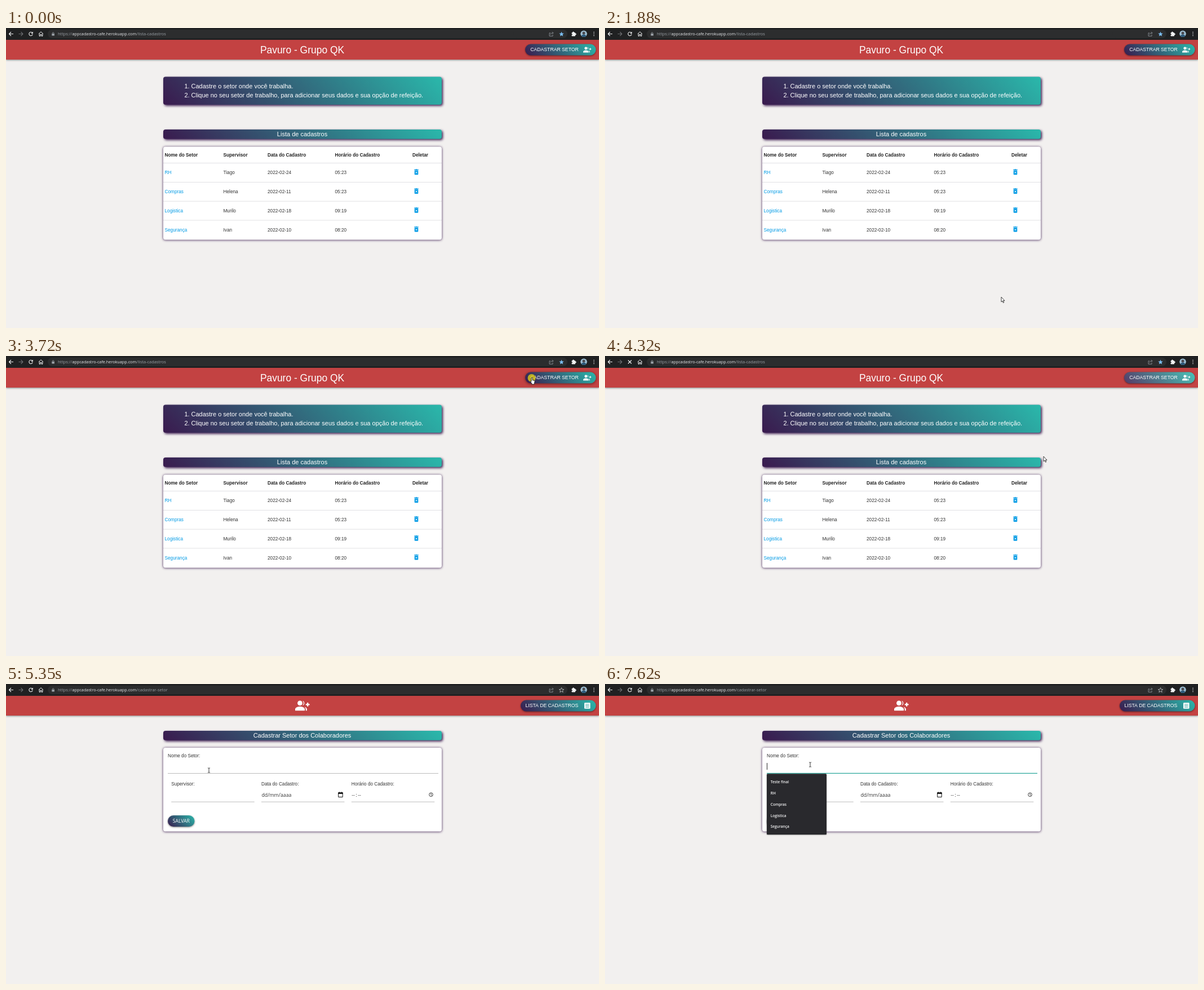
Recreate the animation shown at these times as an HTML page with a canvas. Size 1052x532 px, loop 8 s.

```html
<!DOCTYPE html>
<html lang="pt-BR">
<head>
<meta charset="utf-8">
<title>Lista de cadastros</title>
<style>
html, body { margin: 0; width: 100%; height: 100%; overflow: hidden; background: #f2f0ef; }
canvas { display: block; }
</style>
</head>
<body>
<canvas id="stage" width="1052" height="532"></canvas>
<script>
const ctx = document.getElementById('stage').getContext('2d');
const LOOP = 8000, TICK = 70;
const SANS = '"Liberation Sans", Arial, sans-serif';
const UI = '"Open Sans", "Noto Sans", sans-serif';
const PURPLE = '#3a1a4e', TEAL = '#2ab8ab', LINK = '#039be5';

const PAGE_AT = 4390, LOADED_AT = 4460;
const PRESS = [[3660, 3860], [5490, 5740]];
const FOCUS_AT = 5490, MENU_AT = 5590;

// Pointer moves: start time, ticks, from, control point, to
const MOVES = [
  [180, 6, 1021, 532, 700, 480, 403, 404],
  [600, 1, 403, 404, 407, 412, 411, 420],
  [860, 3, 411, 420, 415, 405, 419, 394],
  [1460, 7, 419, 394, 560, 520, 703, 477],
  [2140, 12, 703, 477, 870, 330, 935, 37],
  [3450, 4, 935, 37, 934, 38, 933, 39],
  [3860, 7, 933, 39, 858, 100, 778, 178],
  [4860, 8, 778, 178, 560, 185, 360, 153],
  [6020, 4, 360, 153, 362, 148, 364, 143]
];

const clamp = v => Math.max(0, Math.min(1, v));
const smooth = v => v * v * (3 - 2 * v);
const within = (t, [a, b]) => t >= a && t < b;

function pointer(t) {
  const move = MOVES.filter(m => m[0] <= t).pop();
  if (!move) return null;
  const [t0, n, x0, y0, cx, cy, x1, y1] = move;
  const p = smooth(clamp((Math.floor((t - t0) / TICK) + 1) / n)), q = 1 - p;
  return {
    x: q * q * x0 + 2 * p * q * cx + p * p * x1,
    y: q * q * y0 + 2 * p * q * cy + p * p * y1
  };
}

function text(str, x, y, size, color, { font = SANS, weight = 400, align = 'left' } = {}) {
  ctx.font = `${weight} ${size}px ${font}`;
  ctx.textAlign = align;
  ctx.fillStyle = color;
  ctx.fillText(str, x, y);
}

function rect(x, y, w, h, color) {
  ctx.fillStyle = color;
  ctx.fillRect(x, y, w, h);
}

function disc(x, y, r, color) {
  ctx.fillStyle = color;
  ctx.beginPath();
  ctx.arc(x, y, r, 0, 7);
  ctx.fill();
}

function box(x, y, w, h, r, fill, shadow) {
  ctx.save();
  if (shadow) [ctx.shadowColor, ctx.shadowOffsetX, ctx.shadowOffsetY, ctx.shadowBlur] = shadow;
  ctx.fillStyle = fill;
  ctx.beginPath();
  ctx.roundRect(x, y, w, h, r);
  ctx.fill();
  ctx.restore();
}

function path(d, x, y, { fill, stroke, width = 1, scale = 1 }) {
  const p = new Path2D(d);
  ctx.save();
  ctx.translate(x, y);
  ctx.scale(scale, scale);
  ctx.lineWidth = width;
  ctx.lineJoin = 'round';
  if (fill) { ctx.fillStyle = fill; ctx.fill(p); }
  if (stroke) { ctx.strokeStyle = stroke; ctx.stroke(p); }
  ctx.restore();
}

// Same geometry as a CSS 45deg gradient
function diagonal(x, y, w, h) {
  const cx = x + w / 2, cy = y + h / 2, d = (w + h) / 4;
  const g = ctx.createLinearGradient(cx - d, cy + d, cx + d, cy - d);
  g.addColorStop(0, PURPLE);
  g.addColorStop(1, TEAL);
  return g;
}

const banner = (y, h) => box(279, y, 494, h, 4, diagonal(279, y, 494, h), [PURPLE, 2, 2, 4]);
const card = (y, h) => box(279, y, 494, h, 4, '#fff', [PURPLE, 0, 0.5, 4]);
const pill = (x, y, w, h, blur = 3) =>
  box(x, y, w, h, h / 2, diagonal(x, y, w, h), ['rgba(0,0,0,.5)', 0, 1, blur]);

function groupAdd(x, y, scale) {
  const fill = '#fff';
  path('M0 18v-2.6c0-3.3 5.6-4.6 8.5-4.6s8.5 1.3 8.5 4.6V18z', x, y, { fill, scale });
  path('M13.2 .4a4.4 4.4 0 0 1 0 8.4a6.5 6.5 0 0 0 0-8.4z', x, y, { fill, scale });
  path('M16.3 11.2c2.4.6 4.6 1.9 4.6 4.2V18h-2.2v-2.6c0-1.800-1-3.200-2.400-4.200z', x, y, { fill, scale });
  path('M18.800 7h6.800M22.200 3.600v6.800', x, y, { stroke: fill, width: 2.2, scale });
  disc(x + 8.5 * scale, y + 4.6 * scale, 4.4 * scale, fill);
}

function trash(x, y) {
  rect(x - 3.900, y - 4.400, 7.800, 1.1, LINK);
  rect(x - 1.600, y - 5, 3.2, 0.8, LINK);
  box(x - 3.300, y - 2.800, 6.600, 7.700, 1, LINK);
  path('M-1.500-.5l3 3M1.500-.5l-3 3', x, y, { stroke: '#fff', width: 0.9 });
}

function toolbar(t) {
  const second = t >= PAGE_AT, white = '#f1f3f4', grey = '#9aa0a6';
  rect(0, 0, 1052, 21, '#202122');
  box(74, 3, 878, 15, 7.5, '#2c2d2e');
  box(900, 3, 96, 15, 7.5, '#2c2d2e');
  path('M8 0H.6M4-3.500L.5 0 4 3.500', 5, 10.5, { stroke: white, width: 1.1 });
  path('M0 0h7.400M4-3.500L7.500 0 4 3.500', 22.5, 10.5, { stroke: '#6b6d70', width: 1.1 });
  if (t >= 3860 && t < LOADED_AT) {
    path('M-3-3l6 6M3-3l-6 6', 44, 10.5, { stroke: white, width: 1.2 });
  } else {
    path('M2.300-2.300A3.200 3.200 0 1 0 3.200.6', 44, 10.5, { stroke: white, width: 1.1 });
    path('M3.800-4v3.400H.4z', 44, 10.5, { fill: white });
  }
  path('M-4 0L0-3.800 4 0M-2.900-.8V3.800h1.900V1h2v2.800h1.900V-.8', 62, 10.5, { stroke: white });
  rect(81.300, 10, 4.600, 3.600, grey);
  path('M-1.300 0v-1a1.300 1.300 0 0 1 2.600 0v1', 83.600, 10, { stroke: grey, width: 0.8 });

  text('https://', 92, 13.300, 7.4, grey, { font: UI });
  text('appcadastro-cafe.herokuapp.com', 117.5, 13.300, 7.25, '#e8eaed', { font: UI });
  text(second ? '/cadastrar-setor' : '/lista-cadastros', 231.5, 13.300, 7.4, grey, { font: UI });

  path('M-1.500-2H-3.500V3.500H2.500V1M-1.500 1C-1.300-1 0-2 3-2M1.500-4L3.500-2 1.500 0', 967.5, 10.800, { stroke: grey, width: 0.8 });
  path('M0-4.300l1.200 2.900 3.100.2-2.400 2 .8 3L0 2.200-2.700 3.800l.8-3-2.400-2 3.100-.2z', 985.5, 10.800,
    second ? { stroke: '#c4c7ca', width: 0.8 } : { fill: '#7cc0f8' });
  box(1003.5, 8, 6.5, 6.5, 1, white);
  disc(1006.5, 7.800, 1.400, white);
  disc(1010.300, 11, 1.400, white);
  disc(1003.800, 11.300, 1, '#202122');

  ctx.save();
  ctx.beginPath();
  ctx.arc(1025, 10.3, 5.8, 0, 7);
  ctx.clip();
  rect(1019, 4, 12, 13, '#9dbfd3');
  disc(1025, 9, 2.5, '#4a4a50');
  disc(1025, 16, 4.6, '#2c5878');
  ctx.restore();
  for (const y of [7.5, 10.5, 13.5]) disc(1043, y, 0.8, white);
}

function header() {
  box(0, 21, 1052, 35, 0, '#c34242', ['rgba(0,0,0,.45)', 0, 1, 3]);
}

function ripple(t) {
  if (t < 3720) return;
  ctx.save();
  ctx.beginPath();
  ctx.roundRect(921, 28.5, 125.5, 20, 10);
  ctx.clip();
  disc(933, 39, 125 * smooth(clamp((t - 3720) / 500)), 'rgba(255,255,255,.14)');
  ctx.restore();
}

function listPage(t) {
  text('Pavuro - Grupo QK', 525.5, 44.5, 17.45, '#fff', { align: 'center' });
  const hover = clamp((t - 2910) / 280) * clamp((4250 - t) / 280);
  pill(921, 28.5, 125.5, 20, 3 + 2 * hover);
  ripple(t);
  text('CADASTRAR SETOR', 930.3, 41.3, 8.67, '#fff');
  groupAdd(1024, 33.5, 0.56);

  banner(86.5, 49.5);
  text('1.', 316.5, 106.800, 11, '#fff');
  text('Cadastre o setor onde você trabalha.', 328.5, 106.800, 11, '#fff');
  text('2.', 316.5, 123.2, 11, '#fff');
  text('Clique no seu setor de trabalho, para adicionar seus dados e sua opção de refeição.', 328.5, 123.2, 11, '#fff');
  banner(180, 16.800);
  text('Lista de cadastros', 525.5, 192.2, 11, '#fff', { align: 'center' });

  card(210.5, 165);
  const cols = [281.5, 385.5, 464, 583.5, 721];
  ['Nome do Setor', 'Supervisor', 'Data do Cadastro', 'Horário do Cadastro', 'Deletar']
    .forEach((s, i) => text(s, cols[i], 227.600, 8.25, '#222', { weight: 700 }));
  [
    ['RH', 'Tiago', '2022-02-24', '05:23'],
    ['Compras', 'Helena', '2022-02-11', '05:23'],
    ['Logistica', 'Murilo', '2022-02-18', '09:19'],
    ['Segurança', 'Ivan', '2022-02-10', '08:20']
  ].forEach((row, r) => {
    const y = 33.8 * r;
    rect(279, 239.2 + y, 494, 0.7, '#d4d4d8');
    row.forEach((s, i) => text(s, cols[i], 259.4 + y, 8.25, i ? '#333' : LINK));
    trash(728, 255.3 + y);
  });
}

function formPage(t) {
  groupAdd(513, 29.3, 1);
  pill(913, 28.5, 133.5, 20);
  text('LISTA DE CADASTROS', 921.5, 41.3, 8.65, '#fff');
  box(1026, 33.3, 10.5, 10.5, 1, '#fff');
  for (const y of [35.7, 38.2, 40.7]) rect(1028, y, 6.5, 0.9, '#2f9b9c');

  banner(83, 16.8);
  text('Cadastrar Setor dos Colaboradores', 525.5, 94.6, 11, '#fff', { align: 'center' });
  card(113, 148.5);

  const ink = '#333', rule = '#9e9e9e';
  text('Nome do Setor:', 287, 130, 8.2, ink);
  rect(287, 158, 480, 0.7, rule);
  [['Supervisor:', 293.2], ['Data do Cadastro:', 453], ['Horário do Cadastro:', 612.8]].forEach(([s, x]) => {
    text(s, x, 180, 8.2, ink);
    rect(x, 208.7, 147.5, 0.7, rule);
  });
  text('dd/mm/aaaa', 453.5, 199.5, 8.75, ink, { font: UI });
  [['--', 613.3], [':', 620.6], ['--', 624.3]].forEach(([s, x]) => text(s, x, 199.5, 8.75, ink, { font: UI }));
  path('M.5 1.500h7.500v7.500H.5z', 589.2, 191.5, { stroke: '#111' });
  rect(589.2, 192.3, 8.5, 2.6, '#111');
  rect(590.7, 191.3, 1.2, 1.5, '#111');
  rect(595, 191.3, 1.2, 1.5, '#111');
  path('M3.300 0A3.300 3.300 0 1 1-3.300 0A3.300 3.300 0 1 1 3.300 0M0-2V.3L1.500 1.300', 754, 196.2, { stroke: '#222', width: 0.9 });

  pill(287, 233, 47.5, 20);
  text('SALVAR', 310.8, 246.1, 8.6, '#fff', { font: UI, align: 'center' });

  if (t < FOCUS_AT) return;
  ctx.globalAlpha = clamp((t - FOCUS_AT) / 270);
  rect(287, 157.8, 480, 1.2, '#26a69a');
  ctx.globalAlpha = 1;
  if (Math.floor((t - FOCUS_AT) / 532.5) % 2 === 0) rect(287, 140, 0.9, 12, '#111');
  if (t < MENU_AT) return;
  box(287, 159.3, 106, 107.7, 1.5, '#29292d', ['rgba(0,0,0,.5)', 0, 0.5, 2]);
  ['Teste final', 'RH', 'Compras', 'Logistica', 'Segurança'].forEach((s, i) =>
    text(s, 293.7, 176 + 19.85 * i, 6.6, '#f4f4f5', { font: UI, weight: 600 }));
}

function drawPointer(t) {
  const at = pointer(t);
  if (!at) return;
  const { x, y } = at, second = t >= PAGE_AT;
  if (PRESS.some(p => within(t, p))) disc(x - 0.5, y, 7, 'rgba(222,208,20,.78)');
  const look = { fill: '#fff', stroke: '#111', width: 0.8 };
  if (!second && x > 921 && x < 1046 && y > 28 && y < 49) {
    path('M-1 0Q0-1.300 1 0V3.800L4.300 4.600Q5.300 5 5.100 6.200L4.400 9V11H-.4V9.600L-2.700 6.300Q-2.600 5-1 6.200z', x, y, look);
  } else if (second && x > 287 && x < 767 && y > 137 && y < 158) {
    path('M-2-4H-.5L0-3.500.5-4H2M0-3.500V3.500M-2 4H-.5L0 3.500.5 4H2', x, y, { stroke: '#222', width: 0.9 });
  } else {
    path('M0 0V8.800L2 7 3.400 10.300 4.800 9.700 3.400 6.500H6z', x, y, look);
  }
}

function frame(now) {
  const t = now % LOOP;
  rect(0, 0, 1052, 532, '#f2f0ef');
  header();
  toolbar(t);
  (t < PAGE_AT ? listPage : formPage)(t);
  drawPointer(t);
}

const start = performance.now();
function run() {
  frame(performance.now() - start);
  requestAnimationFrame(run);
}
run();
</script>
</body>
</html>
```
